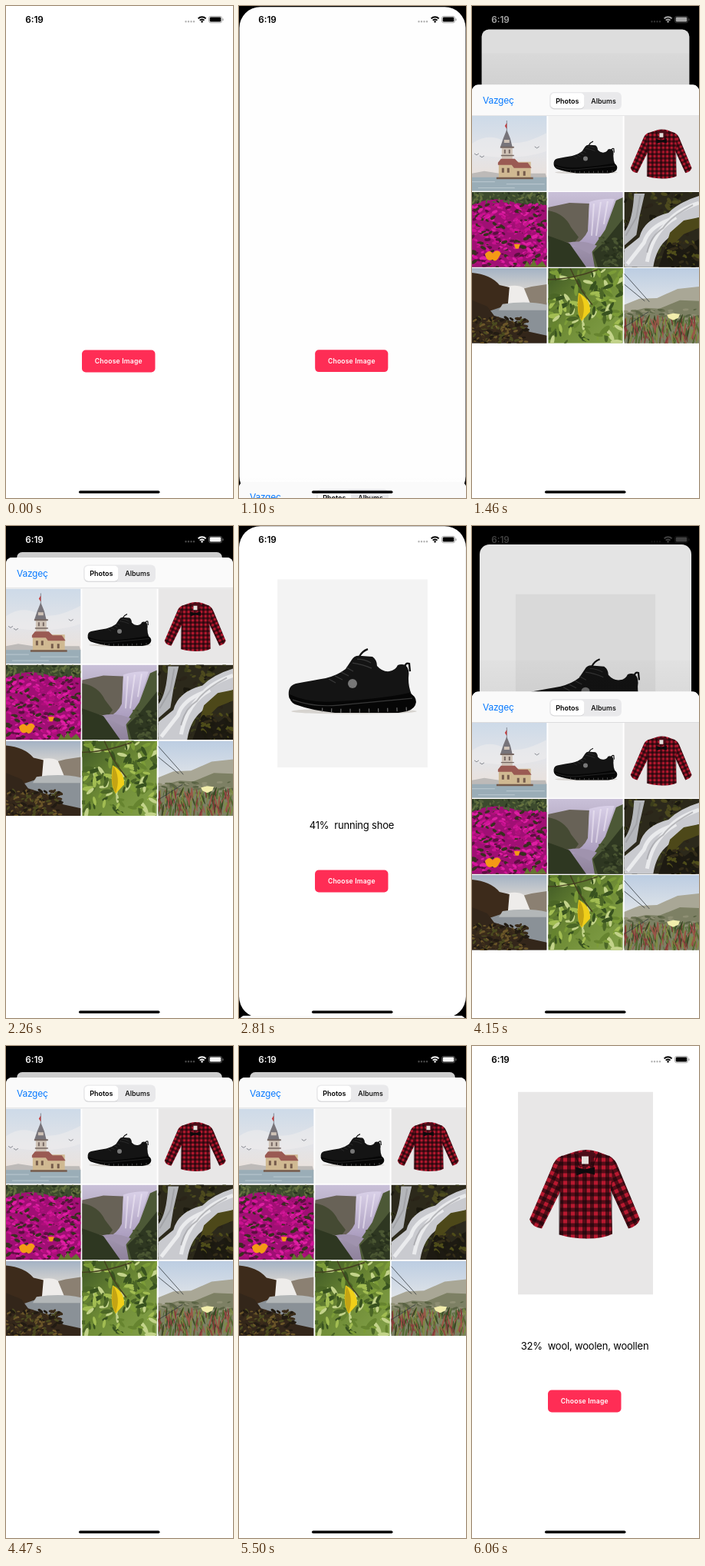
Write an HTML page that moves like this. It is 296 px wide and 640 px high and loops after 6160 ms.

```html
<!DOCTYPE html>
<html lang="en">
<head>
<meta charset="utf-8">
<title>Image picker</title>
<style>
  html, body { margin: 0; width: 100%; height: 100%; overflow: hidden; background: #000; }
  svg { display: block; }
  text { font-family: Inter, Roboto, sans-serif; }
</style>
</head>
<body>
<svg id="stage" width="296" height="640" viewBox="0 0 296 640">
  <defs>
    <linearGradient id="towerSky" x2="0" y2="1"><stop stop-color="#cddae8"/><stop offset=".5" stop-color="#e3e4e8"/><stop offset=".8" stop-color="#e9e1dc"/></linearGradient>
    <linearGradient id="mist" x2="0" y2="1"><stop stop-color="#c9c0d8"/><stop offset="1" stop-color="#8f829c"/></linearGradient>
    <linearGradient id="veil" x2="0" y2="1"><stop stop-color="#d9d0e8"/><stop offset="1" stop-color="#a698ba"/></linearGradient>
    <linearGradient id="fallsSky" x2="0" y2="1"><stop stop-color="#a3b2c4"/><stop offset="1" stop-color="#efe4d6"/></linearGradient>
    <linearGradient id="duneSky" x2="0" y2="1"><stop stop-color="#bccde2"/><stop offset=".5" stop-color="#e0e4e8"/></linearGradient>
    <linearGradient id="glow" y2="1"><stop stop-color="#3d5624"/><stop offset=".5" stop-color="#6f8c36"/><stop offset="1" stop-color="#84a24a"/></linearGradient>
    <linearGradient id="shade" x2="0" y2="1"><stop stop-opacity=".02"/><stop offset="1" stop-opacity=".06"/></linearGradient>

    <pattern id="plaid" x="114" y="140" width="10" height="10" patternUnits="userSpaceOnUse">
      <path fill="#b8182f" d="M0 0h10v10H0z"/>
      <path fill="#120508" fill-opacity=".6" d="M0 0h5v10H0z"/>
      <path fill="#120508" fill-opacity=".6" d="M0 0h10v5H0z"/>
    </pattern>
    <pattern id="plaidLeft" href="#plaid" patternTransform="rotate(25 114 150)"/>
    <pattern id="plaidRight" href="#plaid" patternTransform="rotate(-25 182 150)"/>

    <symbol id="shoe" viewBox="50 69 196 245" preserveAspectRatio="xMidYMid slice">
      <path fill="#f3f3f3" d="M50 69h196v245H50z"/>
      <ellipse cx="150" cy="241" rx="82" ry="3.5" fill="#d6d3cf"/>
      <path fill="none" stroke="#111" stroke-width="2.4" d="M157 170Q160 163 168 160M216 184Q217 177 222 179L223 189"/>
      <path fill="#141414" d="M65 222Q63 208 74 205Q96 201 113 198Q129 194 139 186L147 174Q151 167 160 169L174 170Q180 174 180 182Q187 190 196 189Q204 188 207 181Q212 179 217 181Q223 186 221 198Q221 210 225 219L224 232H90Q66 230 65 222Z"/>
      <path fill="#060606" d="M66 219Q90 231 130 228Q185 225 222 217Q231 221 231 229Q230 238 219 241L208 243H125Q95 240 73 232Q65 228 66 219Z"/>
      <path fill="none" stroke="#383838" stroke-width="1.2" d="M70 226Q98 236 130 233T226 224M117 199l9 5M125 195l10 5M133 190l10 5M140 184l9 5M148 178q14 2 25 7M154 173q10 0 18 5"/>
      <path fill="none" stroke="#707070" stroke-width="5" stroke-dasharray="1.2 11" d="M108 239Q145 242 219 238"/>
      <circle cx="148" cy="205" r="6" fill="#777"/>
    </symbol>

    <symbol id="shirt" viewBox="60 59 176 264" preserveAspectRatio="xMidYMid slice">
      <path fill="#e8e7e7" d="M60 59h176v264H60z"/>
      <path fill="url(#plaidLeft)" d="M118 142Q108 145 104 158L75 225Q78 235 91 237L117 185Z"/>
      <path fill="url(#plaidRight)" d="M178 142Q187 146 191 158L219 225Q216 234 204 237L180 185Z"/>
      <path fill="url(#plaid)" d="M134 137L116 143Q112 160 115 188L114 245Q130 250 150 250Q172 250 183 244L181 188Q185 160 180 143L164 137Q149 132 134 137Z"/>
      <path fill="none" stroke="#1b060a" stroke-opacity=".7" stroke-width="1.2" d="M114 176V245M182 176V244M149 165V250M133 138L141 157L149 153L157 157L165 138M77 224l14 6M217 224l-14 6"/>
      <path fill="#4b0d18" d="M137 139Q149 134 161 139L150 158Z"/>
      <path fill="#e4e0dc" d="M143 143h9v10h-9z"/>
      <path fill="#0d0a0c" d="M135 157L147 160L160 157V167L148 164L136 168Z"/>
    </symbol>

    <symbol id="tower" viewBox="0 82 98 98">
      <path fill="url(#towerSky)" d="M0 82h98v98H0z"/>
      <path fill="#f1eff0" fill-opacity=".5" d="M0 118q20-14 40-4t58-10v24q-40 14-98 4z"/>
      <path fill="#bdbab8" d="M0 157l16-3 20 3h60l2 6H0z"/>
      <path fill="#9aadb7" d="M0 162h98v18H0z"/>
      <path fill="none" stroke="#bccad1" d="M0 168h30M45 171h50M8 176h48"/>
      <path fill="none" stroke="#6f747b" stroke-width=".8" d="M3 131l3 2 3-2M10 134l3 2 3-2M82 122l3 2 3-2M45.500 88v18"/>
      <path fill="#c33b3d" d="M45.500 91l-2.500 4 2.500 4z"/>
      <path fill="#77747a" d="M45.500 100L50 111 53 123H37l4-12z"/>
      <path fill="#cfc2b6" d="M39 123h14v19H39zM42 113h7v4h-7z"/>
      <path fill="#766762" d="M37 122h18v2H37zM38 133h17v1.500H38zM42 126h2v5h-2zM48 126h2v5h-2z"/>
      <path fill="#d0b992" d="M35 142h42v21H35z"/>
      <path fill="#9a5a53" d="M34 143l4-5h18l5 5h12l5 7H55l-3-4H34z"/>
      <path fill="#755b4c" d="M39 150h3v6h-3zM46 150h3v6h-3zM59 154h3v6h-3zM67 154h3v6h-3zM32 162h48v2.500H32z"/>
    </symbol>

    <symbol id="flowers" viewBox="0 181 98 98">
      <path fill="#3c4a2d" d="M0 181h98v98H0z"/>
      <path fill="#a00f74" d="M0 198q25-12 50-5t48 5v81H0z"/>
      <g id="shrub"/><g id="petals"/>
      <path fill="#64752f" d="M68 279l4-8 4 6 5-8 4 8 7-6 6 8z"/>
      <path fill="#f49a15" d="M17 262q6-7 10-1 6-7 11 0l-4 7q-4 5-7 1-8 4-10-7zM55 249l8 0-2 6h-4z"/>
    </symbol>

    <symbol id="gorge" viewBox="99 181 98 98">
      <path fill="url(#mist)" d="M99 181h98v98H99z"/>
      <path fill="#686257" d="M99 201l28-6 26 1-2 54-52-4z"/>
      <path fill="url(#veil)" d="M153 194q16-5 33-4l-12 38-10 27-34-3q16-8 21-20z"/>
      <path fill="none" stroke="#f0eaf6" stroke-opacity=".6" stroke-width="2" d="M159 196l-3 42M168 194l-6 44M177 193l-5 30"/>
      <path fill="#454a33" d="M99 205q22 4 30 22l10 13-6 8-34-6z"/>
      <path fill="#4c5836" d="M197 188l-9 4-14 38-18 26 4 23h37z"/>
      <path fill="#2e3721" d="M197 216l-25 31-14 13 6 19h33zM99 238l28 10 22 31H99z"/>
      <path fill="#a093ae" d="M125 247q20-4 38 4l-9 11q-12-6-29-15z"/>
      <g id="slopes"/>
    </symbol>

    <symbol id="stream" viewBox="198 181 98 98">
      <path fill="#2c291b" d="M198 181h98v98h-98z"/>
      <g id="moss"/>
      <path fill="#c9cacf" d="M296 186q-26 8-40 22-32 8-38 32l-20 16v23h38q4-26 20-38 17-20 40-27z"/>
      <path fill="#b4b6ba" d="M211 183h14l-7 30-4 24-16 14v-18q11-13 13-50z"/>
      <path fill="none" stroke="#f6f6f7" stroke-opacity=".75" stroke-width="5" d="M296 195q-28 10-38 22-28 10-34 30l-22 28M266 214q-30 16-38 58"/>
      <path fill="none" stroke="#96979c" stroke-opacity=".6" stroke-width="2" d="M288 198q-30 16-39 30-16 10-21 32M219 186l-5 28-14 24"/>
      <path fill="#4d4819" d="M258 234l18-16 20-4v14l-20 8-14 14-12 11z"/>
      <path fill="#1d1a12" d="M243 279l8-23 16-10 10 10 19-14v37z"/>
      <g id="boulders"/>
    </symbol>

    <symbol id="falls" viewBox="0 280 98 98">
      <path fill="url(#fallsSky)" d="M0 280h98v42H0z"/>
      <path fill="#8a9197" d="M0 325h98v53H0z"/>
      <path fill="#8b8072" d="M66 307l12-3 20-3v27H70z"/>
      <path fill="#eeecea" d="M46 304q14-3 22 2l9 22H44z"/>
      <path fill="#3d2b1b" d="M0 286q24 2 36 16l13 3-2 23-30 10-17 2z"/>
      <path fill="#b3b7b8" d="M40 327q32-5 58 1v7H35z"/>
      <path fill="#33261a" d="M0 322l20 8 9 12 32 10 14 11 23 5v10H0z"/>
      <g id="rocks"/>
    </symbol>

    <symbol id="leaves" viewBox="99 280 98 98">
      <path fill="url(#glow)" d="M99 280h98v98H99z"/>
      <g id="foliage"/>
      <path fill="none" stroke="#443f20" stroke-width="1.500" d="M128 280q10 22 19 35l10 13M99 295q30 0 65-13"/>
      <path fill="#f0cf19" d="M139 312q16 9 15 25l-11 12q-8-11-4-37z"/>
      <path fill="#c4a414" d="M140 313q10 15 3 35-8-11-3-35z"/>
    </symbol>

    <symbol id="dune" viewBox="198 280 98 98">
      <path fill="url(#duneSky)" d="M198 280h98v98h-98z"/>
      <path fill="#a9a796" d="M198 328l20-8 23-1 27-12 28-3v74h-98z"/>
      <path fill="#7d8064" d="M198 339l28-7 18 1 27-11 25 1v55h-98z"/>
      <g id="scrub"/><g id="grass"/>
      <path fill="none" stroke="#333a3d" stroke-width=".8" d="M198 287l33 37M198 301l27 22M198 357l32-20"/>
      <path fill="#f2edac" d="M254 341l8-2 9 1-2 5-7 3-6-3z"/>
    </symbol>
  </defs>

  <rect width="296" height="640"/>

  <g id="home">
    <rect id="page" width="296" height="640" fill="#fff"/>
    <use id="picked"/>
    <text id="label" x="147" y="394.500" font-size="13" letter-spacing="-.2" text-anchor="middle"/>
    <g id="button">
      <rect x="99" y="447.500" width="95.500" height="29" rx="5" fill="#ff2d55"/>
      <text x="146.800" y="465.200" font-size="8.600" font-weight="600" letter-spacing=".2" text-anchor="middle" fill="#fff">Choose Image</text>
    </g>
    <rect id="dim" width="296" height="640"/>
  </g>

  <g id="status" fill="currentColor">
    <text x="25.200" y="22" font-size="11.700" font-weight="600">6:19</text>
    <path fill="none" stroke="currentColor" stroke-opacity=".3" stroke-width="2.400" stroke-linecap="round" stroke-dasharray="0 3.500" d="M234.500 20.200h11"/>
    <path fill="none" stroke="currentColor" stroke-width="1.900" d="M250.600 16.400a7 7 0 0 1 10 0M252.700 18.700a4 4 0 0 1 5.800 0"/>
    <path d="M253.900 20.100a2.400 2.400 0 0 1 3.400 0l-1.700 1.900z"/>
    <rect x="264.500" y="13.400" width="17" height="8.400" rx="2.400" fill="none" stroke="currentColor" stroke-opacity=".4" stroke-width=".8"/>
    <rect x="265.700" y="14.600" width="14.600" height="6" rx="1.400"/>
    <rect x="282.400" y="16.200" width="1.200" height="2.800" rx=".6" opacity=".4"/>
  </g>

  <g id="sheet">
    <rect id="band" width="296" height="41" fill="url(#shade)"/>
    <rect y="41" width="296" height="660" rx="8" fill="#fff"/>
    <path fill="#fafafa" d="M0 81V49a8 8 0 0 1 8-8h280a8 8 0 0 1 8 8v32z"/>
    <path fill="#d2d2d4" d="M0 80.600h296v.7H0z"/>
    <text x="14" y="65.700" font-size="12" letter-spacing="-.25" fill="#087aff">Vazgeç</text>
    <rect x="101" y="50.500" width="94" height="22.500" rx="6" fill="#e9e9eb"/>
    <rect x="102.400" y="52.600" width="44" height="20" rx="5" fill="#000" opacity=".12"/>
    <rect x="102.400" y="51.800" width="44" height="20" rx="5" fill="#fff"/>
    <g font-size="9" text-anchor="middle">
      <text x="124.300" y="65" font-weight="600">Photos</text>
      <text x="171.500" y="65" font-weight="500">Albums</text>
    </g>
    <g id="grid"/>
  </g>

  <rect x="95" y="630.500" width="105.500" height="3.400" rx="1.700"/>
</svg>

<script>
const $ = id => document.getElementById(id);
const setAll = (id, attributes) => {
  for (const name in attributes) $(id).setAttribute(name, attributes[name]);
};

let seed = 7;
const rand = (min = 0, max = 1) => {
  seed = (seed * 16807) % 2147483647;
  return min + (max - min) * seed / 2147483647;
};

// Fills a group with randomly placed ellipses, tilted by up to `tilt` degrees.
function scatter(id, count, [x, y, w, h], rx, ry, tilt, colors) {
  $(id).innerHTML = Array.from({ length: count }, () => {
    const size = rand(0.5, 1.3), color = colors[Math.floor(rand(0, colors.length))];
    const at = `${rand(x, x + w)} ${rand(y, y + h)}`;
    return `<ellipse rx="${rx * size}" ry="${ry * size}" fill="${color}"
      transform="translate(${at}) rotate(${rand(-tilt, tilt)})"/>`;
  }).join("");
}

scatter("shrub", 60, [0, 181, 98, 14], 3, 1.2, 90, ["#27331f", "#52623a", "#65723f"]);
scatter("petals", 380, [0, 197, 98, 82], 3.4, 1.7, 40, ["#c8128f", "#dd1fa2", "#d3149a", "#b00f7c", "#5c0f40", "#38301f"]);
scatter("slopes", 50, [168, 240, 29, 39], 3, 1.5, 60, ["#262f1b", "#3d482a", "#4a5632"]);
scatter("moss", 130, [198, 181, 98, 98], 4, 2, 80, ["#1b190f", "#3b3d1b", "#4d4a1e", "#2a2418"]);
scatter("boulders", 50, [256, 246, 40, 33], 4, 2, 60, ["#1b190f", "#4f4d1a", "#332c18"]);
scatter("rocks", 150, [0, 345, 72, 33], 3.5, 1.6, 60, ["#221b12", "#4b4a1f", "#6b5629", "#3b2c1a"]);
scatter("foliage", 150, [99, 280, 98, 98], 7, 2.4, 90, ["#7c9c38", "#a2bd52", "#4b6626", "#38521f", "#c3d38a", "#66842f"]);
scatter("scrub", 70, [198, 334, 98, 20], 4, 1.4, 20, ["#6a7050", "#8f8f74", "#5a6344"]);
scatter("grass", 220, [198, 346, 98, 32], 0.9, 7, 25, ["#526b30", "#7d8b42", "#87393a", "#9a5547", "#3b4b25"]);

const photos = ["tower", "shoe", "shirt", "flowers", "gorge", "stream", "falls", "leaves", "dune"];
$("grid").innerHTML = photos.map((id, i) =>
  `<use href="#${id}" x="${i % 3 * 99.2}" y="${81.5 + Math.floor(i / 3) * 99}" width="97.6" height="97.6"/>`
).join("");

const LOOP = 6160;
// The screen only refreshes at these moments.
const ticks = [0, 640, 910, 1100, 1220, 1340, 1460, 1570, 1680, 2260, 2370, 2480, 2590, 2700, 2810,
  3800, 3910, 4030, 4150, 4260, 4370, 4470, 5500, 5620, 5730, 5840, 5950, 6060];

const glide = (t, start) => 1 - (1 - Math.min(1, Math.max(0, (t - start) / 530))) ** 1.9;
const between = (t, from, to) => t >= from && t < to;

function draw(t) {
  const open = glide(t, 1090) - glide(t, 2312) + glide(t, 3897) - glide(t, 5510);
  const scale = 1 - 0.095 * open;
  const rx = open > 0 ? 28 - 20 * open : 0;
  const light = Math.round(255 * open ** 4);
  const pressed = between(t, 640, 910) || between(t, 3800, 3910);

  setAll("home", { transform: `translate(${148 * (1 - scale)} ${34 * open}) scale(${scale})` });
  setAll("page", { rx });
  setAll("dim", { rx, opacity: 0.15 * open });
  setAll("button", { opacity: pressed ? 0.6 : 1 });
  setAll("status", { color: `rgb(${light},${light},${light})` });
  setAll("sheet", { transform: `translate(0 ${599 * (1 - open)})` });
  setAll("band", { opacity: open });

  // Both pictures fit inside a 196 by 264 box.
  const [href, width, height, label] = t < 2260 ? ["", 0, 0, ""]
    : t < 5500 ? ["#shoe", 196, 245, "41%\u00a0 running shoe"]
    : ["#shirt", 176, 264, "32%\u00a0 wool, woolen, woollen"];
  setAll("picked", { href, width, height, x: 148 - width / 2, y: 191.5 - height / 2 });
  $("picked").style.display = href ? "inline" : "none";
  $("label").textContent = label;
}

let shown = -1;
function frame() {
  const now = performance.now() % LOOP;
  const tick = ticks.findLast(time => time <= now);
  if (tick !== shown) draw(shown = tick);
  requestAnimationFrame(frame);
}
frame();
</script>
</body>
</html>
```
